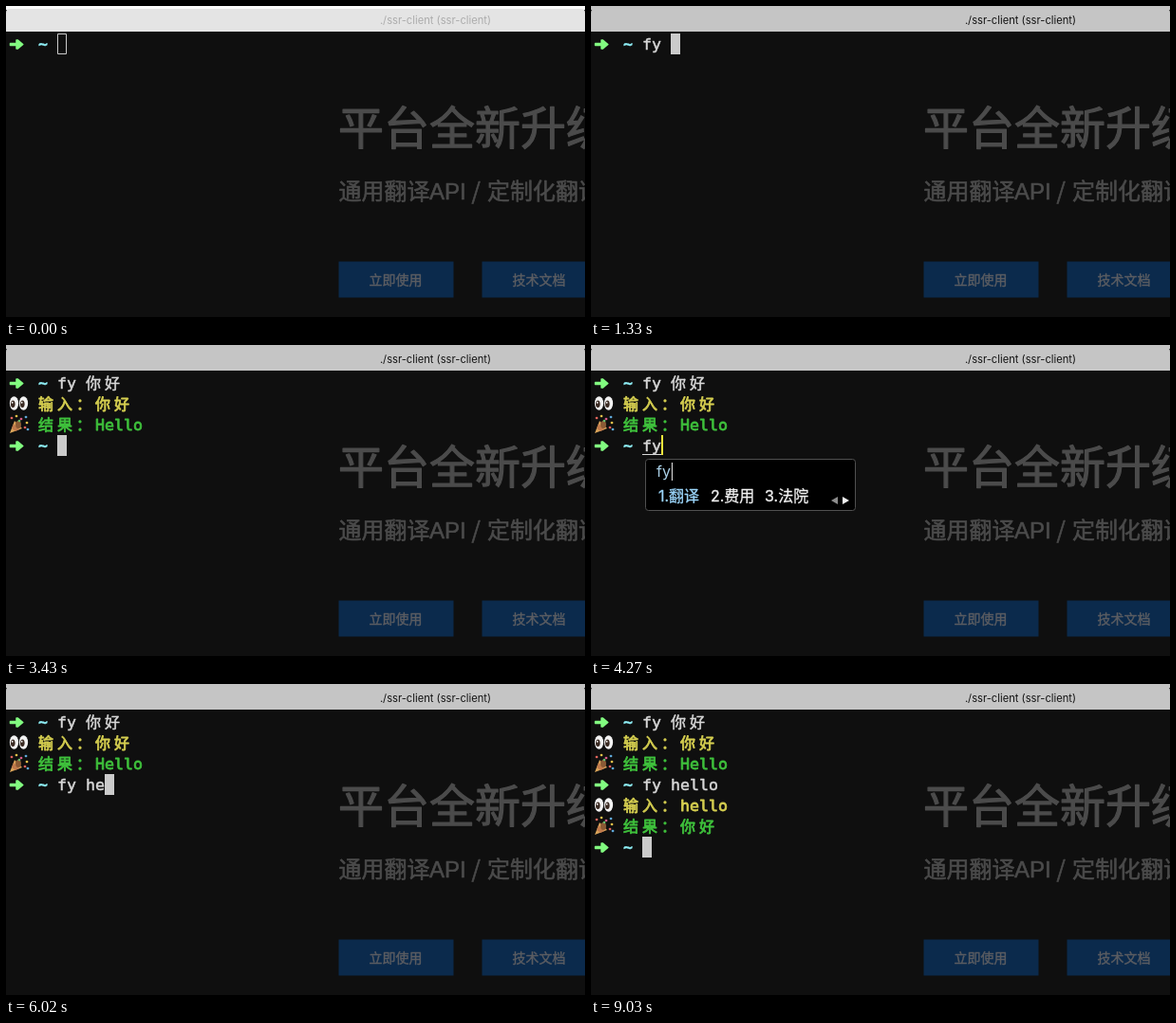
These frames come from a looping animation (610 px wide and 328 px high, 9.38 s). An HTML page with a canvas:

```html
<!DOCTYPE html>
<html lang="zh">
<head>
<meta charset="utf-8">
<style>
html, body { margin: 0; width: 100%; height: 100%; overflow: hidden; background: #0f0f0f; }
canvas { display: block; }
</style>
</head>
<body>
<canvas id="stage" width="610" height="328"></canvas>
<script>
const ctx = document.getElementById('stage').getContext('2d');
const LOOP = 9380, CELL = 10, LINE = 22, LEFT = 4, TOP = 29;
const CJK = '"Noto Sans CJK SC", "Noto Sans CJK", sans-serif';
const MONO = '16.6px "DejaVu Sans Mono", monospace';
const WHITE = '#d8d8d8', YELLOW = '#d6cf50', GREEN = '#3fc23c', ARROW = '#82fb80', CYAN = '#8eeef5';

const colX = col => LEFT + col * CELL;
const rowY = row => TOP + row * LINE;

function rect(x, y, w, h, color) {
  ctx.fillStyle = color;
  ctx.fillRect(x, y, w, h);
}

// "bolder" is the width of an outline that thickens the strokes.
function text(str, x, y, font, color, { align = 'left', bolder = 0 } = {}) {
  ctx.font = font;
  ctx.fillStyle = ctx.strokeStyle = color;
  ctx.textAlign = align;
  ctx.lineJoin = 'round';
  ctx.fillText(str, x, y);
  if (!bolder) return;
  ctx.lineWidth = bolder;
  ctx.strokeText(str, x, y);
}

function shape(points, color) {
  ctx.fillStyle = color;
  ctx.beginPath();
  points.forEach(([x, y]) => ctx.lineTo(x, y));
  ctx.closePath();
  ctx.fill();
}

function oval(x, y, rx, ry, color) {
  ctx.fillStyle = color;
  ctx.beginPath();
  ctx.ellipse(x, y, rx, ry, 0, 0, Math.PI * 2);
  ctx.fill();
}

// Terminal text: CJK characters take two cells.
function cells(str, col, row, color, bolder = 0.5) {
  for (const ch of str) {
    const wide = ch > '\u2fff';
    text(ch, colX(col), rowY(row) + 17, wide ? '16px ' + CJK : MONO, color, { bolder });
    col += wide ? 2 : 1;
  }
  return col;
}

function page() {
  rect(0, 0, 610, 328, '#0f0f0f');
  const gray = '#4b4b4b';
  text('平台全新升级', 350, 145.5, '48px ' + CJK, gray, { bolder: 1.2 });
  const subtitle = (str, x, family) => text(str, x, 204, '24px ' + family, gray, { bolder: 0.6 });
  subtitle('通用翻译', 350.5, CJK);
  subtitle('API', 446, '"Liberation Sans", sans-serif');
  subtitle('/', 490.5, CJK);
  subtitle('定制化翻译', 507, CJK);
  [[351, '立即使用'], [502, '技术文档']].forEach(([x, label]) => {
    rect(x - 0.5, 269.5, 121, 38, '#0b2a4c');
    text(label, x + 59.5, 294, '14px ' + CJK, '#5b5d62', { align: 'center', bolder: 0.4 });
  });
}

function titleBar(t) {
  const focus = Math.min(3, Math.floor(t / 70)) / 3;
  const mix = (a, b) => {
    const v = Math.round(a + (b - a) * focus);
    return `rgb(${v},${v},${v})`;
  };
  rect(0, 0, 610, 4, mix(250, 196));
  ctx.fillStyle = mix(228, 197);
  ctx.beginPath();
  ctx.roundRect(0, 3, 610, 24, [4, 4, 0, 0]);
  ctx.fill();
  text('./ssr-client (ssr-client)', 452.5, 19, '11.2px Inter, sans-serif', mix(172, 20), { align: 'center' });
}

function prompt(row) {
  const y = rowY(row) + 11.5;
  const arrow = [[4.5, y - 1], [11, y - 1], [11, y - 4.5], [12.5, y - 4.5], [17.8, y],
    [12.5, y + 4.5], [11, y + 4.5], [11, y + 1], [4.5, y + 1]];
  shape(arrow, ARROW);
  ctx.strokeStyle = ARROW;
  ctx.lineWidth = 1.5;
  ctx.lineJoin = 'round';
  ctx.stroke();
  text('~', colX(3), rowY(row) + 17, 'bold ' + MONO, CYAN, { bolder: 0.4 });
}

function eyes(row) {
  const y = rowY(row) + 10.5;
  [8.5, 18.5].forEach(x => {
    oval(x, y, 4.6, 7.3, '#f2f2f2');
    oval(x - 1.2, y + 0.8, 2.3, 3.8, '#3a2a22');
    oval(x - 1.8, y - 0.8, 0.8, 1, '#fff');
  });
}

function popper(row) {
  const y = rowY(row);
  shape([[4, y + 20], [9, y + 7], [17, y + 15]], '#dba55a');
  shape([[6, y + 15], [8, y + 10], [14, y + 16], [10, y + 18]], '#c07a4c');
  oval(13, y + 11, 3, 4, '#8a5a35');
  [[6, 4, '#e0645c'], [11, 2, '#e6c04a'], [16, 5, '#d85a88'], [21, 3, '#5fa8d8'],
    [22, 9, '#e6c04a'], [20, 14, '#d9605a'], [14, 7, '#68b86a'], [23, 16, '#5fa8d8']]
    .forEach(([x, dy, color]) => oval(x, y + dy, 1.4, 1.3, color));
}

function inputLine(row, word) {
  eyes(row);
  cells('输入：' + word, 3, row, YELLOW, 0.8);
}

function resultLine(row, word) {
  popper(row);
  cells('结果：' + word, 3, row, GREEN, 0.8);
}

function cursor(col, row, hollow) {
  const x = colX(col), y = rowY(row);
  if (!hollow) return rect(x, y, 10, 22, '#cbcbcb');
  ctx.strokeStyle = '#cbcbcb';
  ctx.lineWidth = 1;
  ctx.strokeRect(x + 0.5, y + 0.5, 9, 21);
}

function inputMethod(col, row, typed, words, xs, width, alpha) {
  const x = colX(col) + 3, y = rowY(row) + 25;
  const end = cells(typed, col, row, WHITE);
  rect(colX(col), y - 5, typed.length * CELL, 1, WHITE);
  rect(colX(end), y - 25, 2, 21, '#f3e53c');
  ctx.globalAlpha = alpha;
  ctx.fillStyle = '#000';
  ctx.strokeStyle = '#505050';
  ctx.lineWidth = 1;
  ctx.beginPath();
  ctx.roundRect(x + 0.5, y + 0.5, width - 1, 54, 3);
  ctx.fill();
  ctx.stroke();
  text(typed, x + 12, y + 19, '16px Inter, sans-serif', '#a9cfe6');
  rect(x + 13 + ctx.measureText(typed).width, y + 4, 1, 19, '#eee');
  words.forEach((word, i) =>
    text(`${i + 1}.${word}`, x + xs[i], y + 45, '16px Inter, ' + CJK, i ? '#f2f2f2' : '#9bd5fa', { bolder: 0.3 }));
  const right = x + width, mid = y + 44;
  shape([[right - 26, mid], [right - 19, mid - 4], [right - 19, mid + 4]], '#8c8c8c');
  shape([[right - 7, mid], [right - 14, mid - 4], [right - 14, mid + 4]], '#f2f2f2');
  ctx.globalAlpha = 1;
}

// Latest string whose time has come.
const typedAt = (t, keys) => keys.reduce((now, [at, str]) => t >= at ? str : now, '');

function commandLine(row, str, withCursor, hollow) {
  prompt(row);
  const end = cells(str, 5, row, WHITE);
  if (withCursor) cursor(end, row, hollow);
}

function firstCommand(t) {
  const composing = t >= 1890 && t < 2520;
  const str = typedAt(t, [[770, 'f'], [1190, 'fy'], [1330, 'fy '], [2520, 'fy 你好']]);
  commandLine(0, str, !composing && t < 2870, t < 70);
  if (composing) {
    const both = t >= 2240;
    inputMethod(8, 0, both ? 'ni' : 'n', [...(both ? '你尼呢腻拟' : '你那能年呢')],
      [14, 51, 90, 129, 169], 236, t < 1960 ? 0.6 : 1);
  }
  if (t >= 2870) inputLine(1, '你好');
  if (t >= 3430) resultLine(2, 'Hello');
}

function secondCommand(t) {
  const composing = t >= 3990 && t < 4690;
  const str = typedAt(t, [[4690, 'fy'], [5250, 'fy '], [5740, 'fy h'], [5950, 'fy he'],
    [6160, 'fy hel'], [6300, 'fy hell'], [6510, 'fy hello']]);
  commandLine(3, str, !composing && t < 7210);
  if (composing) {
    inputMethod(5, 3, t < 4200 ? 'f' : 'fy', ['翻译', '费用', '法院'], [14, 69, 126], 222, 1);
  }
  if (t >= 7210) inputLine(4, 'hello');
  if (t >= 7840) {
    resultLine(5, '你好');
    commandLine(6, '', true);
  }
}

function draw(now) {
  const t = now % LOOP;
  page();
  titleBar(t);
  firstCommand(t);
  if (t >= 3430) secondCommand(t);
  requestAnimationFrame(draw);
}
requestAnimationFrame(draw);
</script>
</body>
</html>
```
